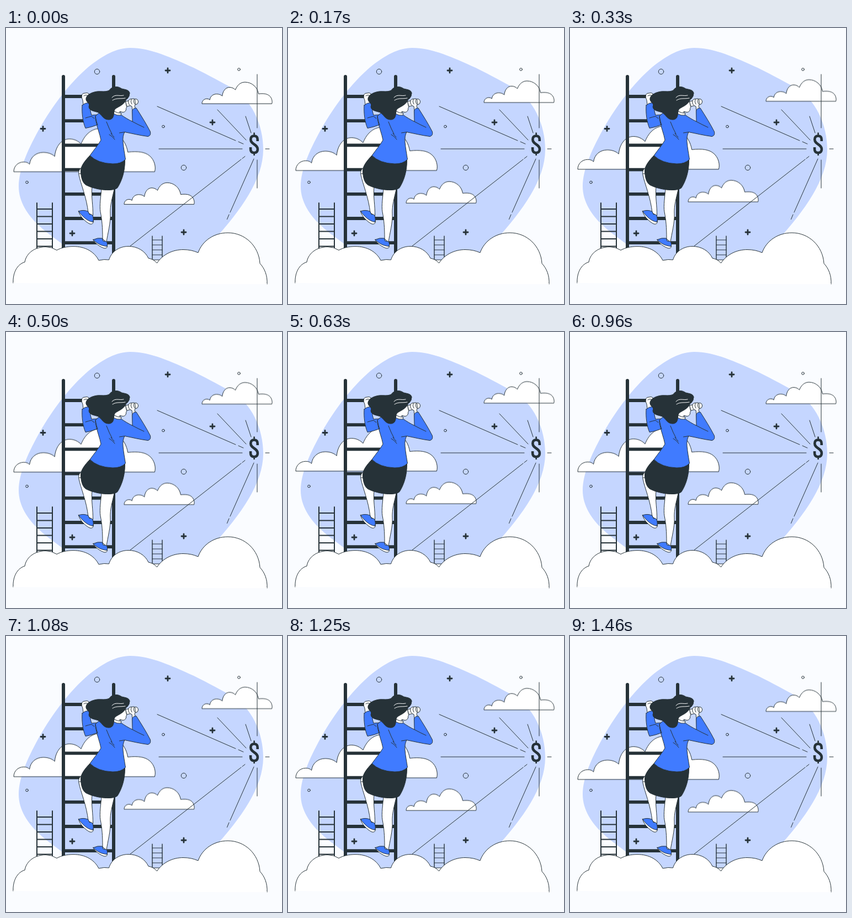
Recreate the animation shown at these times as an HTML page. Size 500 by 500 pixels, loop 1500 ms.

```html
<!DOCTYPE html>
<html lang="en">
<head>
<meta charset="utf-8">
<title>Looking ahead</title>
<style>
  html, body { margin: 0; width: 100%; height: 100%; overflow: hidden; background: #fafcff; }
  svg { display: block; width: 100%; height: 100%; }
  .line { fill: none; stroke: #263238; stroke-width: 1; stroke-linecap: round; stroke-linejoin: round; }
  .white { fill: #fff; }
  .blue { fill: #407bff; }
  .dark { fill: #263238; }
  .cloud { vector-effect: non-scaling-stroke; }
</style>
</head>
<body>
<svg viewBox="0 0 500 500" xmlns="http://www.w3.org/2000/svg">
  <defs>
    <path id="puff" class="line white cloud" d="M0,0 C0,-5 4,-8.6 9,-8.6 Q12.5,-8.6 14.2,-6.6
      C15,-13 20,-17.2 26.5,-17.2 C31,-17.2 34.500,-15.800 36.800,-13.600
      C37.500,-22 42.500,-29.300 50,-29.300 C54.500,-29.300 58,-27.400 60.500,-24.800
      C64,-33.500 70,-38.700 78,-38.700 C90,-38.700 100.500,-30 102.500,-17.500
      C112,-18.500 118,-17.500 122,-14.200 C126.500,-10.500 128,-4 126.700,0 Z"/>
  </defs>

  <path fill="#c5d6ff" d="M225,36 C262,36 300,54 340,72 C370,87 390,98 410,109
    C445,130 466,175 466,220 C466,275 425,330 378,383 L340,420 H130 C110,392 80,378 60,358
    C40,340 23,315 23,287 C23,255 42,215 62,180 C85,140 115,100 150,70 C175,50 200,36 225,36 Z"/>

  <g id="clouds">
    <use href="#puff" transform="translate(14 260) scale(2.016)"/>
    <use href="#puff" transform="translate(214 319)"/>
    <use href="#puff" transform="translate(355 136.800)"/>
  </g>

  <g id="marks" class="line"></g>
  <path class="line" d="M455,84 V181 M455,239 V290 M277,219 H428 M470,219 H477 M274,142 L416,204 M421,206 L430,210
    M383,148 L435,203 M434,160 L444,190 M225,395 L426,238 M428,236.500 L433,232.500 M449,237 L406,334 M404,338 L400.500,346.500"/>
  <g class="line" style="stroke-linecap:butt">
    <path stroke-width="4.600" style="stroke-width:4.6" d="M455.700,205 V202 Q455.700,195.500 449.500,195.500 Q443.300,195.500 443.300,202
      C443.300,211 455.900,210.500 455.900,219.500 Q455.900,226 449.500,226 Q443.100,226 443.100,219.500 V216"/>
    <path style="stroke-width:2.6" d="M449.600,189.500 V195 M449.600,226 V231"/>
  </g>

  <g id="ladders" class="line"></g>

  <path class="line white" d="M13,462 C12,444 20,428 34,424 C37,407 53,396.500 72,396.500 Q83,396.500 92,402.500
    C100,398 111,395.700 122,395.700 C143,395.700 160,405 168,421 Q178,418.500 186.500,420
    C191,405 205,395.500 222,395.500 C238,395.500 252,404 258,417 Q268,419 273.500,426
    C284,410 302,401.500 321,401.500 Q336,401.500 348,407 C356,385 377,371 402,371
    C433,371 458,395 460,426.500 C468,435 474,448 473,464"/>
  <path class="white" d="M13,462 L473,464 V463 L13,461 Z"/>

  <g id="climber">
    <!-- legs and shoes -->
    <path class="line white" d="M137,253 C132,256 131,261 132,266 C135,282 146,306 149,335 L157.500,340 C158,322 154,306 156,286 Z"/>
    <path class="line white" d="M173,290 C172,305 169,322 171,333 C174,348 175,362 175,382 L182,388 C184,373 190,352 189,337 C188,322 193,307 196.500,290 Z"/>
    <path class="line" d="M132.500,264 L139,263.500"/>
    <g id="shoe">
      <path class="line white" d="M131.500,332 C133,340 143,351 152,355 Q158,356.500 158.500,350 L157,345 Z"/>
      <path class="line blue" d="M131.500,332 Q140,328.500 149,332.500 L151,337.500 Q156,337 157.500,341 Q159,347 157.500,351.500 C147,350 138,341 131.500,332 Z"/>
    </g>
    <path class="line white" d="M158,383.500 C161,390 171,397 178,399 Q183.500,399.500 183.500,395 L182,391 Z"/>
    <path class="line blue" d="M158,383.500 Q166,379.500 174.500,381 L176,386 Q181,385.500 183,388 Q184,392 183.200,395.500 C173,395 164,390 158,383.500 Z"/>

    <!-- skirt -->
    <path class="line dark" d="M153,230 C143,240 134.500,251 135.500,260 C136,270 138,280 145,284.500
      C158,291 174,294 188,293.500 Q198,293 202,289.500 C209,278 216,262 215.500,237 Z"/>

    <!-- gripping hand and its sleeve -->
    <path class="line white" d="M140,139 L139,131 Q136,126 137.500,121 Q139,117.500 143,118 Q148,116.500 150,119 Q151.500,121 149,123
      Q152,127 149.500,131 L149.500,137 Z"/>
    <path class="line" d="M141,123 Q145,120 149,123"/>
    <path class="line blue" d="M138,140 Q143,135 150,135.500 C152,144 153,152 155,158 L167,157 L168,174 C160,178 152,180 144,181.500
      C139,170 137,154 138,140 Z"/>

    <!-- face, neck and looking hand -->
    <path class="line white" d="M194,132 L214,127 Q218,132 217.500,138 L219,143 Q217,145 217.500,148 Q216,153 211,152.500 L206,151 L208,160 L194,158 Z"/>
    <path class="line white" d="M217,133 L235,128.500 Q239.500,129 239.500,134 Q239,138 236,138.500 L219,142 Z"/>
    <path class="line white" d="M229,150 L228,142 Q222,140 221.500,134 Q222,128.500 227,128.500 L232,128 Q235,129.500 234,134
      Q236,138 233,141 L235,148 Z"/>
    <path class="line" d="M227,129 Q225,134 228,138 M232,129 Q230,134 233,138"/>

    <!-- shirt -->
    <path class="line blue" d="M162,160 Q166,153 177,153 L196,154 L208,157 C215,162 222,166 229,169.500 L228.500,150
      Q230,145 236,145 C245,159 255,175 261.500,188 Q263,195 257,196.500 C242,194.500 228,191 215,188.500
      Q211,195 212,207 C213,218 215,228 216.500,238 Q208,246.500 193,246 Q166,245 152,231 C159,221 167,212 172,203
      C170,192 165,180 163,169 Z"/>
    <path class="line" d="M229,169.500 Q239,175 250,180 M205.500,190 L215,188.500 M182,170 Q187,183 192,192 M187,193 Q193,196 197,202
      M190,191 L196,198 M162,160 Q163,168 166,176 M144,163 Q150,161 155,160 L160,164"/>
    <path class="line white" d="M196,151 Q203,155 209,154 L208,158 Q201,159 195,155.500 Z"/>

    <!-- hair -->
    <path class="line dark" d="M224,118 C223,110 212,112 208,109 C202,104.500 191,106 187,113 C178,117 170,113 160,116
      C150,118.500 144,124 145,130 C146,134 150,136 151,139 Q149,143 151,146 C155,151 162,151 167,153
      C173,157 176,164 182,165.500 Q189,167.500 193,163 C197,157 194,151 198,146.500
      C205,142 213,139 216.500,132 Q217,129.500 220,128 Q224,124 224,118 Z"/>
    <path class="line" style="stroke:#fff" d="M192,126 C198,119 205,124 213,122 M193,131 C200,126 208,129 216,127"/>
  </g>
</svg>
<script>
  const NS = "http://www.w3.org/2000/svg";
  const $ = id => document.getElementById(id);
  function add(parent, tag, attrs, width) {
    const el = document.createElementNS(NS, tag);
    for (const k in attrs) el.setAttribute(k, attrs[k]);
    if (width) el.style.strokeWidth = width;
    parent.append(el);
  }

  // plus signs and rings: x, y, radius
  for (const [x, y] of [[293, 77], [67, 182.5], [374, 171], [120, 372], [322, 370]])
    add($("marks"), "path", { d: `M${x - 4},${y} h8 M${x},${y - 4} v8` }, 2.8);
  for (const [cx, cy, r] of [[165, 79, 4.7], [422, 75, 2.3], [285, 178.5, 2.3], [322, 253, 4.7], [38, 279.5, 2.3]])
    add($("marks"), "circle", { cx, cy, r });

  function ladder(left, right, top, bottom, first, gap, count, rail, rung) {
    let d = "";
    for (let i = 0; i < count; i++) d += `M${left},${first + i * gap} H${right} `;
    add($("ladders"), "path", { d }, rung);
    add($("ladders"), "path", { d: `M${left},${top} V${bottom} M${right},${top} V${bottom}` }, rail);
  }
  ladder(104, 195, 88, 425, 124, 44.2, 7, 6, 5.8);
  ladder(56, 84, 317, 410, 328, 13.5, 6, 2, 1.8);
  ladder(265, 283, 377, 428, 384, 9, 5, 1.4, 1.2);

  // 24 poses a second, up and back down
  const easing = "steps(18)";
  $("clouds").animate([
    { transform: "translateY(0px)", easing },
    { transform: "translateY(-10px)", easing },
    { transform: "translateY(0px)" }
  ], { duration: 1500, delay: -5, iterations: Infinity });
</script>
</body>
</html>
```
